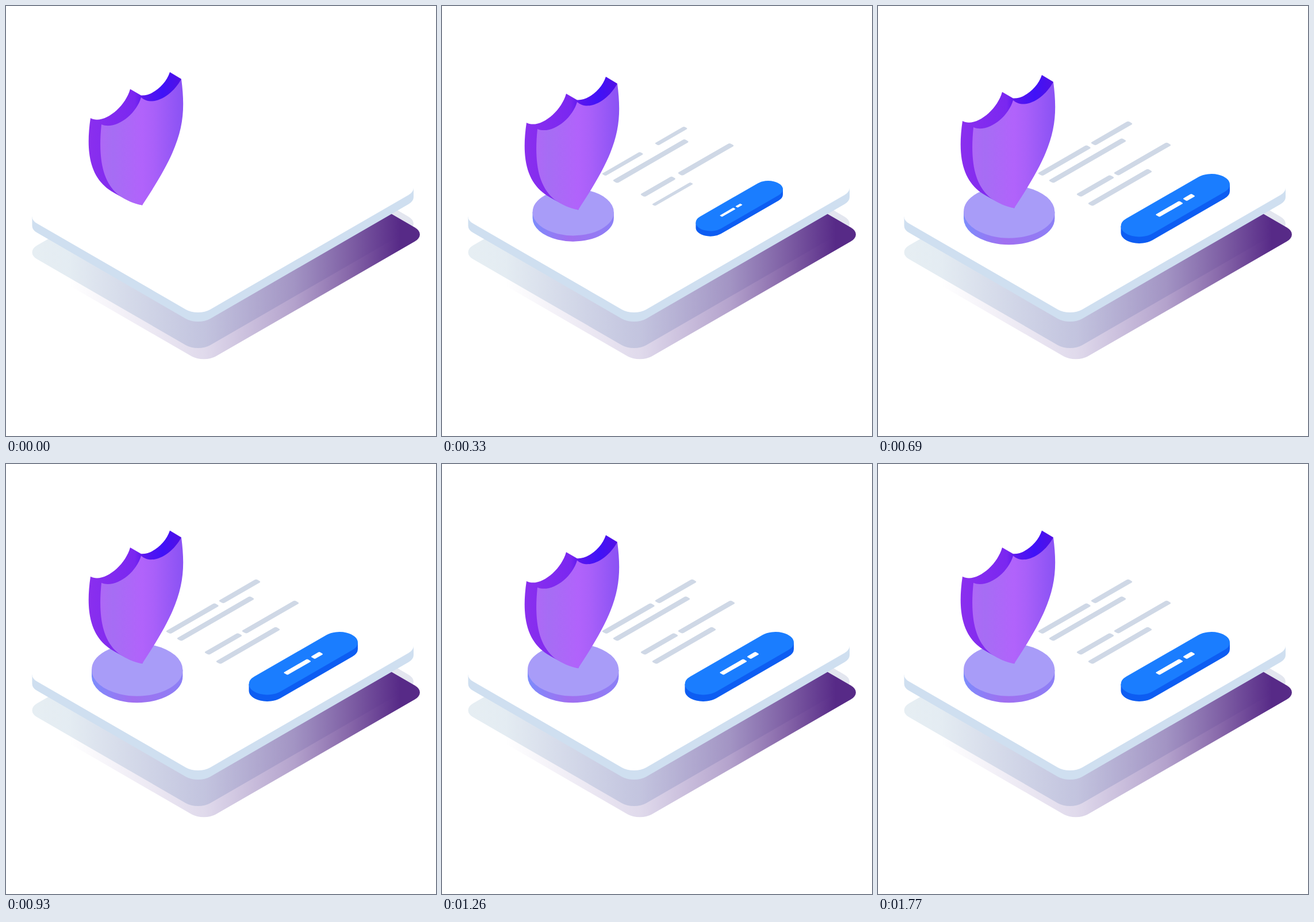
Animation of 748 by 748 pixels, one loop 1800 ms. Source, as an HTML page:

```html
<!DOCTYPE html>
<html lang="en">
<head>
<meta charset="utf-8">
<title>Isometric shield</title>
<style>
  html, body { margin: 0; width: 100%; height: 100%; overflow: hidden; background: #fff; }
  svg { display: block; width: 100%; height: 100%; }
</style>
</head>
<body>
<svg id="stage" viewBox="0 0 748 748">
  <defs>
    <linearGradient id="shade" gradientUnits="userSpaceOnUse" x1="110" y1="0" x2="685" y2="0">
      <stop offset="0" stop-color="#5a3a98" stop-opacity="0"/>
      <stop offset=".41" stop-color="#5a3a98" stop-opacity=".19"/>
      <stop offset=".68" stop-color="#58318e" stop-opacity=".45"/>
      <stop offset=".85" stop-color="#572a87" stop-opacity=".72"/>
      <stop offset="1" stop-color="#572a87"/>
    </linearGradient>
    <linearGradient id="glow" gradientUnits="userSpaceOnUse" x1="50" y1="0" x2="640" y2="0">
      <stop offset="0" stop-color="#e6eef3"/>
      <stop offset=".48" stop-color="#dbe4ef"/>
      <stop offset="1" stop-color="#e3e6ef"/>
    </linearGradient>
    <linearGradient id="rim">
      <stop offset="0" stop-color="#7c8cfc"/>
      <stop offset=".45" stop-color="#a16ff0"/>
      <stop offset="1" stop-color="#8c80f6"/>
    </linearGradient>
    <linearGradient id="body" gradientUnits="userSpaceOnUse" x1="143" y1="0" x2="305" y2="0">
      <stop offset="0" stop-color="#8a2fee"/>
      <stop offset=".5" stop-color="#7a27f0"/>
      <stop offset=".6" stop-color="#5a16ee"/>
      <stop offset=".8" stop-color="#4012f8"/>
      <stop offset="1" stop-color="#5210e4"/>
    </linearGradient>
    <linearGradient id="face" gradientUnits="userSpaceOnUse" x1="164" y1="0" x2="308" y2="0">
      <stop offset="0" stop-color="#ae68f6"/>
      <stop offset=".15" stop-color="#a66df4"/>
      <stop offset=".5" stop-color="#b163fb"/>
      <stop offset=".65" stop-color="#a960f9"/>
      <stop offset="1" stop-color="#8a52f4"/>
    </linearGradient>
  </defs>

  <path fill="url(#glow)" d="M45.5 428.4A30 17.3 0 0 0 54.3 440.6L312.8 589.9A30 17.3 0 0 0 355.2 589.9L700.2 390.8A30 17.3 0 0 0 700.2 366.4L650 337L100 390L54.3 416.2A30 17.3 0 0 0 45.5 428.4Z"/>
  <path fill="url(#shade)" d="M60 457.3L322.8 609.3A30 17.3 0 0 0 365.2 609.3L711.2 409.6A30 17.3 0 0 0 711.2 385.2L640 344.1L60 400Z"/>
  <path fill="#cfdff0" d="M45.5 366.4v16A30 17.3 0 0 0 54.3 394.6L312.8 543.9A30 17.3 0 0 0 355.2 543.9L700.2 344.8A30 17.3 0 0 0 709 332.6v-16Z"/>
  <path fill="#fff" d="M45.5 366.4A30 17.3 0 0 0 54.3 378.6L312.8 527.9A30 17.3 0 0 0 355.2 527.9L700.2 328.8A30 17.3 0 0 0 709 316.6V300L45.5 350Z"/>

  <g id="parts"></g>

  <g id="shield">
    <path fill="url(#body)" d="M147 195C169 207 207 177 216 144.5L235 155.5C254 157 278 137 285 115L305 127L237 346.5C215 340 200 332 183 322C150 301 137 262 147 195Z"/>
    <path fill="url(#face)" d="M166 206C190 216 226 190 235 159C256 177 290 155 305 127C315 204 304 245 237 346.5C222 344 209 338 196 329C168 306 160 266 166 206Z"/>
  </g>
</svg>
<script>
const LOOP = 1800, STEP = 30;
const parts = document.getElementById('parts');
const shield = document.getElementById('shield');
const movers = [];

function add(parent, tag, attrs) {
  const el = document.createElementNS('http://www.w3.org/2000/svg', tag);
  for (const key in attrs) el.setAttribute(key, attrs[key]);
  parent.appendChild(el);
  return el;
}

// A group that grows from nothing around (x, y).
function grower(x, y, start, duration) {
  const el = add(parts, 'g', {});
  movers.push({ el, x, y, start, duration });
  return el;
}

// Isometric rounded bar; (x, y) is the lower left corner of its bounding box.
function bar(parent, x, y, width, thick, radius, fill) {
  const inset = 0.507 * radius;
  const dy = 0.29 * radius - thick / 2;
  add(parent, 'rect', {
    width: (width + 2 * inset) / 0.866 - thick, height: thick, rx: radius, fill,
    transform: `matrix(.866 -.5 .866 .5 ${x - inset} ${y + dy})`
  });
}

// Isometric stadium with a side wall; equal ends give a disc.
function slab(parent, [x1, y1], [x2, y2], rx, depth, top, side) {
  const ry = rx * 0.577, kx = rx * 0.7071, ky = ry * 0.7071;
  const arc = (x, y) => `A${rx} ${ry} 0 0 0 ${x} ${y}`;
  add(parent, 'path', {
    fill: side,
    d: `M${x1 - rx} ${y1}v${depth}${arc(x1 + kx, y1 + ky + depth)}` +
       `L${x2 + kx} ${y2 + ky + depth}${arc(x2 + rx, y2 + depth)}v${-depth}Z`
  });
  add(parent, 'path', {
    fill: top,
    d: `M${x1 - kx} ${y1 - ky}${arc(x1 - rx, y1)}${arc(x1 + kx, y1 + ky)}` +
       `L${x2 + kx} ${y2 + ky}${arc(x2 + rx, y2)}${arc(x2 - kx, y2 - ky)}Z`
  });
}

// x, y, width, start, duration
[
  [279, 295, 90.5, 160, 431],
  [371, 242, 71, 160, 431],
  [298, 307.5, 133, 9, 440],
  [346, 331.5, 64, 68, 440],
  [411, 294.5, 98, 9, 440],
  [366, 347.5, 110, 208, 425]
].forEach(([x, y, width, start, duration]) =>
  bar(grower(x, y, start, duration), x, y, width, 9.8, 3, '#cfd8e6'));

slab(grower(517.2, 352, 92, 574), [454.5, 382.9], [580, 310.5], 32, 11.5, '#1a7dff', '#0d5df2');

const label = grower(483.5, 366.5, 221, 440);
bar(label, 483.5, 366.5, 46.5, 8.2, 2, '#fff');
bar(label, 531, 338.7, 20, 8.2, 2, '#fff');

slab(grower(228.2, 363.5, 0, 630), [228.2, 358], [228.2, 358], 79.2, 11.5, '#a89cf8', 'url(#rim)');

const easeOut = p => 1 - (1 - p) ** 3;

function draw(t) {
  for (const { el, x, y, start, duration } of movers) {
    const s = easeOut(Math.min(1, Math.max(0, (t - start) / duration)));
    el.setAttribute('visibility', s > 0 ? 'visible' : 'hidden');
    el.setAttribute('transform', `translate(${x} ${y}) scale(${s}) translate(${-x} ${-y})`);
  }
  const drop = 10.8 * (1 - Math.abs(1 - (t % 900) / 450));
  shield.setAttribute('transform', `translate(0 ${drop})`);
}

const origin = performance.now();
function tick() {
  const t = (performance.now() - origin) % LOOP;
  draw(Math.floor(t / STEP) * STEP);
  requestAnimationFrame(tick);
}
tick();
</script>
</body>
</html>
```
